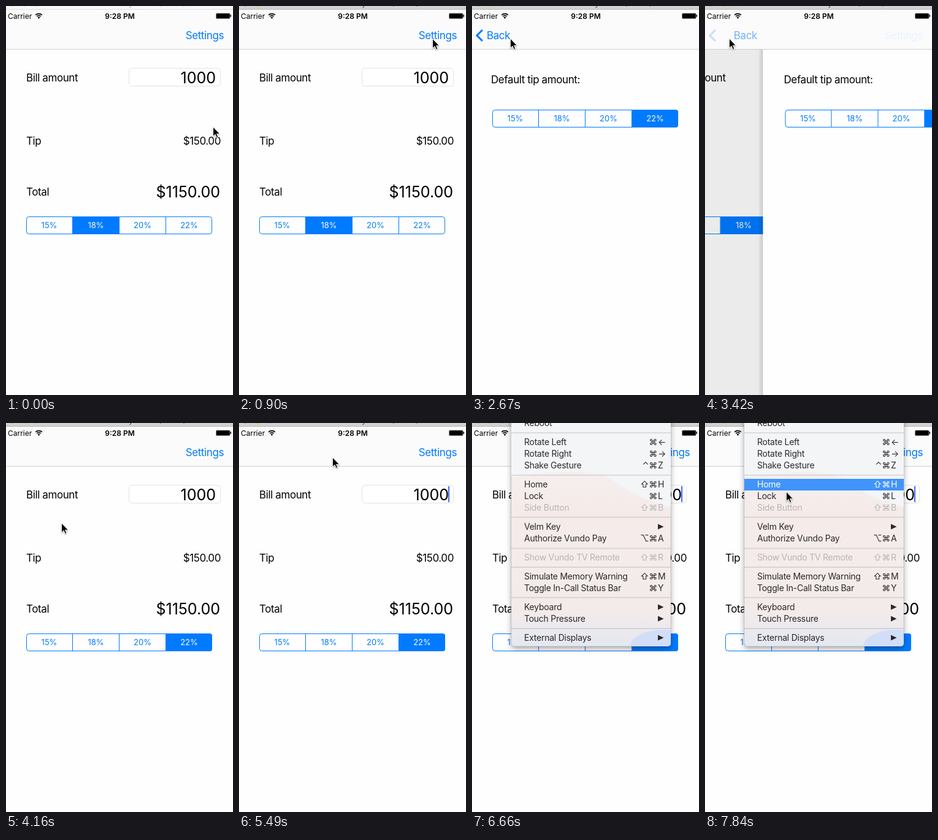
Write an HTML page that moves like this. It is 370 px wide and 634 px high and loops after 7.99 s.

```html
<!DOCTYPE html>
<html lang="en">
<head>
<meta charset="utf-8">
<style>
  html, body { margin: 0; height: 100%; overflow: hidden; background: #fefefe; }
  svg { display: block; width: 370px; height: 634px; font: 17px Inter, "DejaVu Sans", sans-serif; }
  text { letter-spacing: -.4px; white-space: pre; }
  .big { font-size: 25px; letter-spacing: 0; }
  .seg { font-size: 13px; letter-spacing: 0; text-anchor: middle; }
  .status { font-size: 12px; letter-spacing: 0; }
  .menu { font-size: 14px; letter-spacing: -.25px; }
  .end { text-anchor: end; }
</style>
</head>
<body>
<svg id="stage" viewBox="0 0 370 634"></svg>
<script>
const LOOP = 7990, STEP = 147.8, LAST = 53;
const BLUE = '#007aff', W = 375;
const stage = document.getElementById('stage');

// Pointer path: [step, x, y]
const POINTER = [
  [0, 338, 197], [4, 318, 56], [7, 315, 52], [8, 312, 70], [11, 281, 195], [13, 281, 195],
  [14, 283, 186], [18, 63, 53], [19, 63, 53], [20, 55, 52], [23, 40, 53], [27, 82, 155],
  [28, 91, 163], [29, 91, 163], [35, 149, 63], [36, 149, 63], [37, 153, 56], [38, 89, 46],
  [47, 95, 26], [51, 124, 83], [52, 124, 83], [53, 133, 112]
];
const CARET_TOGGLES = [27, 28, 31, 34, 37, 40, 43, 47, 50];

// Menu rows: [centre y, label, modifiers, key, disabled]; key '>' opens a submenu
const MENU = [
  [0, 'Reboot'],
  [31, 'Rotate Left', '⌘', '←'], [50, 'Rotate Right', '⌘', '→'], [69, 'Shake Gesture', '⌃⌘', 'Z'],
  [100, 'Home', '⇧⌘', 'H'], [119, 'Lock', '⌘', 'L'], [138, 'Side Button', '⇧⌘', 'B', true],
  [169, 'Velm Key', '', '>'], [188, 'Authorize Vundo Pay', '⌥⌘', 'A'],
  [219, 'Show Vundo TV Remote', '⇧⌘', 'R', true],
  [250, 'Simulate Memory Warning', '⇧⌘', 'M'], [269, 'Toggle In-Call Status Bar', '⌘', 'Y'],
  [300, 'Keyboard', '', '>'], [319, 'Touch Pressure', '', '>'], [350, 'External Displays', '', '>']
];
const SEPARATORS = [16, 85, 153.5, 204.5, 235, 284.5, 335];

const text = (x, y, str, cls = '', fill = '#000', extra = '') =>
  `<text x="${x}" y="${y}" class="${cls}" fill="${fill}" ${extra}>${str}</text>`;
const rect = (x, y, w, h, fill, extra = '') =>
  `<rect x="${x}" y="${y}" width="${w}" height="${h}" fill="${fill}" ${extra}/>`;
const shift = (x, y, body) => `<g transform="translate(${x} ${y})">${body}</g>`;
const halfPixel = v => Math.round(v * 2) / 2;

const DEFS = `<defs>
  <clipPath id="round"><rect x="33" y="0" width="303" height="29" rx="4"/></clipPath>
  <clipPath id="panel"><rect x="64" y="-20" width="260" height="384" rx="5"/></clipPath>
  <linearGradient id="edge"><stop stop-opacity="0"/><stop offset="1" stop-opacity=".15"/></linearGradient>
  <linearGradient id="glass" x2="0" y2="1">
    <stop offset=".25" stop-color="#f5efee"/><stop offset=".4" stop-color="#f5ecea"/>
    <stop offset=".85" stop-color="#f3ebea"/><stop offset="1" stop-color="#e4e8f1"/>
  </linearGradient>
</defs>`;

function pointerAt(k) {
  const i = POINTER.findIndex(p => p[0] >= k);
  const [k1, x1, y1] = POINTER[i], [k0, x0, y0] = POINTER[Math.max(0, i - 1)];
  const f = k1 > k0 ? (k - k0) / (k1 - k0) : 0;
  return [x0 + (x1 - x0) * f, y0 + (y1 - y0) * f];
}

// 0 = bill screen, 1 = settings screen
function settingsShown(k) {
  const decay = start => {
    const rest = Math.exp(-10 * (k * .1485 - start));
    return rest < .004 ? 0 : rest;
  };
  if (k < 8) return 0;
  return k < 23 ? Math.min(1, k < 20 ? 1 - decay(.9) : 1) : decay(3.3854);
}

function segments(y, selected) {
  let s = rect(33 + selected * 75.7, 0, 76, 29, BLUE, 'clip-path="url(#round)"') +
    rect(33.5, .5, 302, 28, 'none', `rx="4" stroke="${BLUE}"`);
  ['15%', '18%', '20%', '22%'].forEach((label, i) => {
    if (i) s += rect(32 + i * 76, 0, 1, 29, BLUE);
    s += text(70.5 + i * 76, 19, label, 'seg', i === selected ? '#fff' : BLUE);
  });
  return shift(0, y, s);
}

function billScreen(k) {
  const caret = CARET_TOGGLES.filter(s => s <= k).length % 2;
  return text(33, 123, 'Bill amount') +
    rect(200.5, 101.5, 149, 29, '#fff', 'rx="4.5" stroke="#e2e2e2"') +
    text(342, 125.5, '1000', 'big end') +
    (caret ? rect(341, 103, 2, 26, '#426bf2') : '') +
    text(33, 226, 'Tip') + text(350, 226, '$150.00', 'end') +
    text(33, 309, 'Total') + text(349, 312, '$1150.00', 'big end') +
    segments(343, k < 27 ? 1 : 3);
}

function settingsScreen(k) {
  return rect(-11, 70, 8, 564, 'url(#edge)') + rect(-3, 70, W, 564, '#fefefe') +
    text(31, 126, 'Default tip amount:') + segments(169, k < 14 ? 1 : 3);
}

function topBars(k, q) {
  const active = k >= 4;
  const lights = active ? ['#cfa8a4', '#f8c231', '#c4c4c4'] : ['#ddd', '#ddd', '#ddd'];
  return rect(0, 0, 370, 71, '#fbfbfb') + rect(0, 70, 370, 1, '#cfcfcf') +
    rect(0, 0, 370, 6, active ? '#d2d2d2' : '#f6f6f6') + rect(0, 5, 370, 1, active ? '#b4b4b4' : '#dcdcdc') +
    lights.map((c, i) => `<circle cx="${10 + i * 20}" cy="-5" r="6" fill="${c}"/>`).join('') +
    text(200, 0, 'Demo Phone – System 9 (13A20)', 'status', active ? '#444' : '#aaa', 'text-anchor="middle"') +
    text(3, 20.5, 'Carrier', 'status') +
    `<path d="M48.2 14.7a7.6 7.6 0 0 1 10.6 0M50.2 17a4.6 4.6 0 0 1 6.6 0" fill="none" stroke="#000" stroke-width="1.7"/>
     <path d="M53.5 20.8l-2-2.1a2.8 2.8 0 0 1 4 0z"/>` +
    text(185.5, 20.5, '9:28 PM', 'status', '#000', 'font-weight="600" text-anchor="middle"') +
    rect(342.5, 12, 22.5, 8.5, '#000', 'rx="1.5" stroke="#777" stroke-width=".8"') +
    rect(365.5, 14, 1.5, 4, '#000', 'rx=".7"') +
    text(355, 54, 'Settings', 'end', BLUE, `opacity="${(1 - q) ** 2}"`) +
    text(24 + 88 * (1 - q), 54, 'Back', '', BLUE, `opacity="${q * q}"`) +
    `<path d="M17 39l-9 9 9 9" fill="none" stroke="${BLUE}" stroke-width="3" opacity="${q ** 5}"/>`;
}

function menu(hoverY) {
  let s = rect(64, -20, 260, 384, 'url(#glass)',
    'rx="5" stroke="#0003" stroke-width=".6" style="filter:drop-shadow(0 4px 5px #0005)"') +
    '<path d="M64-20H324V137Q270 125 225 90 200 78 150 80L64 88Z" fill="#f3f5f7"/>' +
    '<ellipse cx="312" cy="364" rx="54" ry="27" fill="#d2ddf8" clip-path="url(#panel)"/>';
  for (const y of SEPARATORS) s += rect(64, y - 1, 260, 2, '#0000001a');
  for (const [y, label, mods, key, disabled] of MENU) {
    const hover = hoverY >= y - 9 && hoverY < y + 10;
    const ink = hover ? '#fff' : disabled ? '#b9b4b4' : '#2b2929';
    if (hover) s += rect(64, y - 9, 260, 19, '#4194fc');
    s += text(85, y + 5, label, 'menu', ink);
    if (key === '>') s += `<path d="M303 ${y - 4.5}l9.5 4.5-9.5 4.5z" fill="${ink}"/>`;
    else if (key) s += text(302, y + 5, mods, 'menu end', ink) + text(303, y + 5, key, 'menu', ink);
  }
  return s;
}

function pointer(x, y) {
  return shift(x - .5, y, `<path d="M0 0V15.5L3.6 12.3 6 17.6 8.4 16.6 6.1 11.4H11Z" stroke="#fff"
    style="filter:drop-shadow(0 1px 1px #0006)"/>`);
}

function scene(k) {
  const q = settingsShown(k), [x, y] = pointerAt(k);
  const pointerVisible = k < 40 || k >= 47;
  return DEFS + rect(0, 0, 370, 634, '#fefefe') +
    shift(halfPixel(-.3 * W * q), 0, billScreen(k)) +
    (q ? rect(0, 70, 370, 564, '#000', `opacity="${.1 * q}"`) +
      shift(halfPixel(W * (1 - q)), 0, settingsScreen(k)) : '') +
    topBars(k, q) +
    // the highlight trails the pointer tip slightly
    (k >= 43 ? menu(pointerVisible ? y - 3 : -99) : '') +
    (pointerVisible ? pointer(x, y) : '');
}

let shown = -1;
function tick() {
  const k = Math.min(LAST, Math.floor(performance.now() % LOOP / STEP));
  if (k !== shown) stage.innerHTML = scene(shown = k);
  requestAnimationFrame(tick);
}
tick();
</script>
</body>
</html>
```
